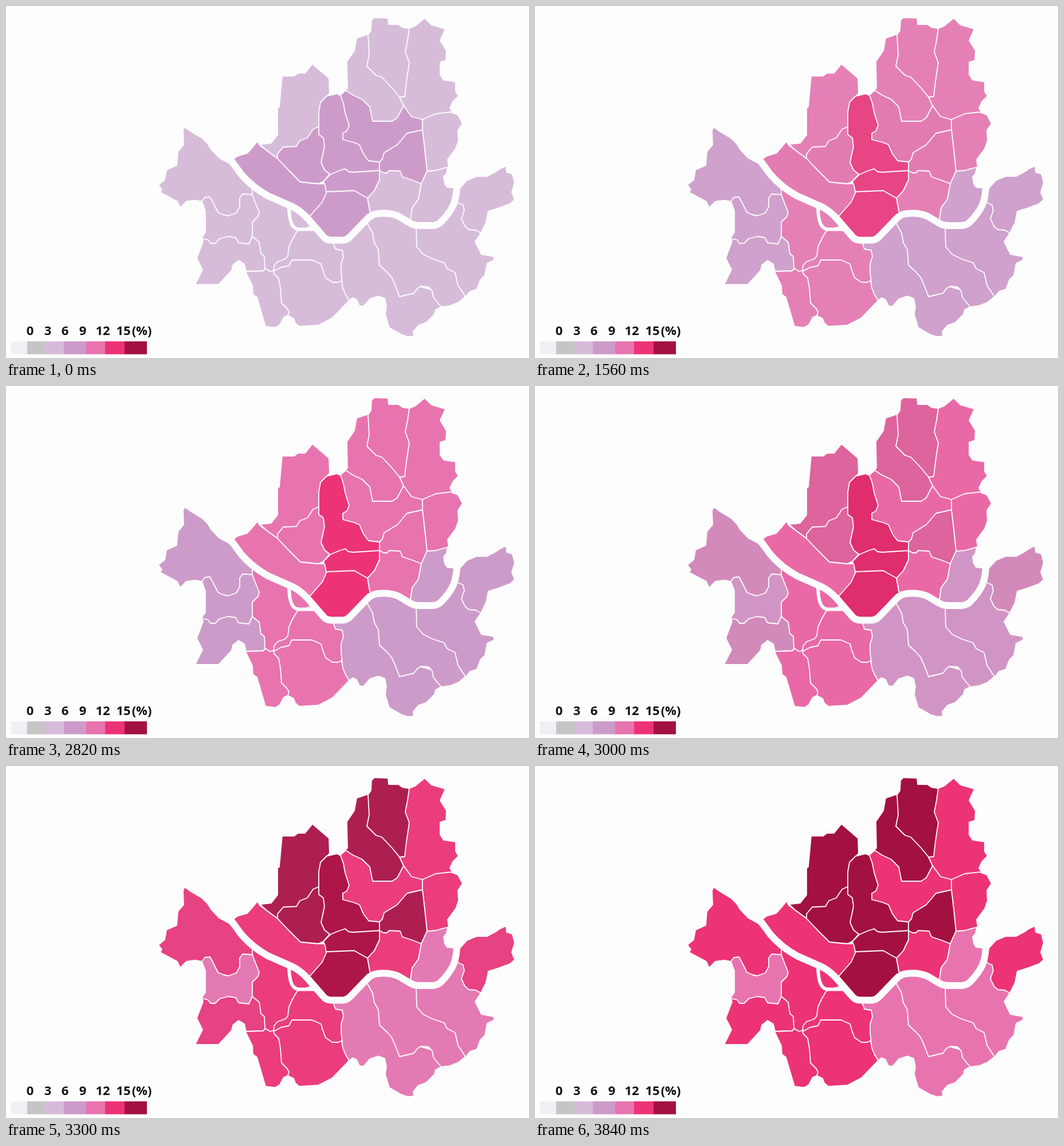
Write an HTML page that moves like this. It is 913 px wide and 614 px high and loops after 4.2 s.

```html
<!DOCTYPE html>
<html lang="en">
<head>
<meta charset="utf-8">
<title>District map</title>
<style>
  html, body { margin: 0; width: 100%; height: 100%; overflow: hidden; background: #fdfdfd; }
  svg { display: block; width: 913px; height: 614px; }
  #map { stroke: #fdfdfd; stroke-width: 1.8; stroke-linejoin: round; }
  #river { fill: none; stroke: #fdfdfd; stroke-width: 12; }
  #legend text {
    font: 700 22px "Noto Sans", "Open Sans", sans-serif;
    font-stretch: 62.5%;
    text-anchor: middle;
    fill: #111;
  }
</style>
</head>
<body>
<svg viewBox="0 0 913 614">
  <!-- Later districts overlap earlier ones; data-levels holds one colour index per stage. -->
  <g id="map">
    <!-- south of the river -->
    <polygon data-levels="245" points="430,316 455,331 502,352 526,371 540,388 520,400 500,440 466,463 461,463 452,458 430,440 425,400 425,330"/>
    <polygon data-levels="235" points="312,211 323,219 343,231 352,240 358,250 372,265 389,274 411,297 430,318 430,340 400,380 360,370 342,341 330,339 315,341 304,352 299,341 269,325 272,320 266,312 277,303 280,286 298,278 300,254 310,242 309,217"/>
    <polygon data-levels="235" points="342,405 344,411 333,440 343,460 330,486 371,486 394,461 396,452 406,444 416,450 419,463 449,462 452,458 451,437 445,432 442,412 430,402 400,395 350,398"/>
    <polygon data-levels="234" points="342,341 347,334 356,333 361,342 370,360 379,364 388,366 402,361 408,350 408,335 413,328 430,329 433,337 442,360 440,367 430,377 430,402 424,415 406,413 401,404 388,402 373,406 365,414 357,414 353,408 341,405 348,395 348,357"/>
    <polygon data-levels="234" points="565,409 590,408 600,403 630,373 660,390 690,480 760,500 761,524 750,530 748,538 734,552 720,557 711,568 712,576 702,577 690,573 669,561 662,538 664,524 661,510 650,506 635,511 624,524 617,523 612,512 605,509 599,514 580,490 570,430"/>
    <polygon data-levels="234" points="712,383 748,383 764,371 783,341 800,343 815,380 829,396 819,411 830,433 852,437 852,443 840,449 836,470 828,478 822,494 810,498 802,508 770,480 705,430"/>
    <polygon data-levels="234" points="630,373 660,361 690,368 716,383 717,420 728,433 744,441 765,448 770,458 784,465 789,487 802,507 790,517 782,520 775,523 760,525 753,517 746,508 744,497 738,490 724,489 718,493 712,501 687,507 679,486 673,473 665,464 652,452 650,425 643,413 640,396 631,380"/>
    <polygon data-levels="235" points="786,330 793,317 805,304 822,297 840,297 855,289 862,284 873,279 874,290 884,293 888,308 883,325 888,338 880,345 858,353 842,358 838,378 829,396 820,391 808,390 801,384 795,371 800,357 798,347 789,343"/>
    <polygon data-levels="245" points="508,393 530,385 557,406 571,409 572,415 575,424 587,426 589,437 585,450 585,465 587,482 560,490 500,470 467,463 468,453 474,446 488,441 492,436 494,420 500,407"/>
    <polygon data-levels="245" points="418,463 449,462 453,458 461,463 468,461 490,500 495,535 492,540 485,543 478,556 470,561 453,559 438,508 431,503 430,488"/>
    <polygon data-levels="245" points="467,463 480,456 494,453 499,443 534,443 550,450 553,461 558,474 570,482 580,482 586,479 588,492 593,504 599,514 570,544 545,557 512,559 505,553 502,545 492,540 494,534 491,528 481,518 479,492 476,475 468,467"/>

    <!-- north of the river -->
    <polygon data-levels="246" points="482,122 503,122 510,117 522,117 535,101 564,126 565,152 560,158 555,220 500,265 474,266 455,252 440,238 445,241 463,239 474,225 474,178 477,176"/>
    <polygon data-levels="246" points="592,147 596,143 595,97 608,78 612,56 633,49 660,110 705,165 694,176 684,215 635,208"/>
    <polygon data-levels="246" points="632,50 637,43 638,25 643,20 667,21 668,32 685,32 692,37 704,39 720,80 710,150 696,166 688,160 674,143 656,124 646,121 630,105 634,85"/>
    <polygon data-levels="245" points="704,39 714,35 731,21 743,33 767,40 758,60 769,78 768,95 758,98 758,120 764,129 785,132 785,149 790,157 780,167 775,178 780,186 770,200 727,200 708,195 694,174 687,159 696,158 699,132 704,99 697,80 701,60"/>
    <polygon data-levels="345" points="584,155 593,147 605,155 622,163 635,176 640,201 674,201 683,195 694,174 708,193 727,198 730,225 680,260 652,278 610,265 580,235"/>
    <polygon data-levels="245" points="727,198 750,188 776,185 789,190 797,205 789,217 790,235 785,249 771,268 773,281 765,290 735,290 731,250 727,216"/>
    <polygon data-levels="346" points="727,216 731,250 735,288 725,310 692,300 652,290 652,272 657,267 660,256 683,242 700,222"/>
    <polygon data-levels="245" points="652,287 659,291 665,291 669,287 688,288 692,298 710,304 725,310 720,337 709,352 706,373 710,381 684,366 662,361 638,365 635,358 631,335 643,322 652,303"/>
    <polygon data-levels="234" points="735,288 750,287 771,281 769,292 764,298 766,310 770,316 780,317 787,318 782,345 764,371 748,383 710,381 706,373 709,352 720,337 725,310"/>
    <polygon data-levels="345" points="397,267 404,262 421,257 430,247 439,236 443,243 455,252 474,266 495,288 514,307 545,310 565,310 555,345 530,367 526,371 502,352 455,331 411,297 398,274"/>
    <polygon data-levels="346" points="474,266 474,258 484,246 507,245 513,235 526,230 536,215 545,211 565,240 568,290 554,306 545,310 514,307 495,288"/>
    <polygon data-levels="356" points="560,157 577,153 584,156 589,170 592,186 599,208 595,218 588,222 588,233 607,238 617,242 624,258 633,270 652,272 652,290 600,300 566,294 556,286 550,273 556,245 554,230 546,224 546,185 549,168"/>
    <polygon data-levels="356" points="566,294 580,288 592,284 598,289 606,290 652,287 652,303 643,322 631,335 605,330 560,330 557,313 554,306"/>
    <polygon data-levels="356" points="560,324 608,322 620,329 631,335 635,358 638,365 600,402 588,408 559,407 526,371 530,367 552,342"/>
  </g>

  <g id="river">
    <path d="M392 268L411 294Q430 316 457 331L500 350Q513 356 527 371L553 401Q558 408 567 408.5H588Q596 408 602 401L631 371Q638 363 650 362Q670 360 686 367L706 379Q712 383 722 383H745Q755 382 760 376Q774 362 781 347Q787 332 787 312"/>
    <path stroke-width="6" style="stroke-width:6" d="M494 353C495 378 500 389 512 389.5H542"/>
  </g>

  <g id="legend"></g>
</svg>
<script>
const LOOP = 4200, FADE = 680, FADE_STARTS = [1080, 2805];
const palette = ['#f2eef6', '#c6c5c6', '#d7bcda', '#cd9bc9', '#e874af', '#ec3376', '#a31141'];
const swatchEdges = [9, 37, 69, 101, 140, 173, 207, 246];
const labels = { '0': 42, '3': 73, '6': 103, '9': 134, '12': 169, '15': 205, '(%)': 237 };

document.getElementById('legend').innerHTML =
  palette.map((color, i) => {
    const x = swatchEdges[i];
    return `<rect x="${x}" y="585" width="${swatchEdges[i + 1] - x}" height="22.5" fill="${color}"/>`;
  }).join('') +
  Object.entries(labels).map(([label, x]) => `<text x="${x}" y="574">${label}</text>`).join('');

const toRgb = hex => [1, 3, 5].map(i => parseInt(hex.slice(i, i + 2), 16));
const rgbPalette = palette.map(toRgb);
const districts = [...document.querySelectorAll('#map polygon')].map(shape => ({
  shape,
  stages: [...shape.dataset.levels].map(level => rgbPalette[level])
}));

const clamp = x => Math.min(1, Math.max(0, x));
const easeInOut = x => x < 0.5 ? 2 * x * x : 1 - 2 * (1 - x) ** 2;
const mix = (from, to, p) => from.map((v, i) => Math.round(v + (to[i] - v) * p));

function draw(now) {
  const time = now % LOOP;
  const stage = time < FADE_STARTS[1] ? 0 : 1;
  const progress = easeInOut(clamp((time - FADE_STARTS[stage]) / FADE));
  for (const { shape, stages } of districts) {
    shape.setAttribute('fill', `rgb(${mix(stages[stage], stages[stage + 1], progress)})`);
  }
}

const start = performance.now();
function tick() {
  draw(performance.now() - start);
  requestAnimationFrame(tick);
}
tick();
</script>
</body>
</html>
```
